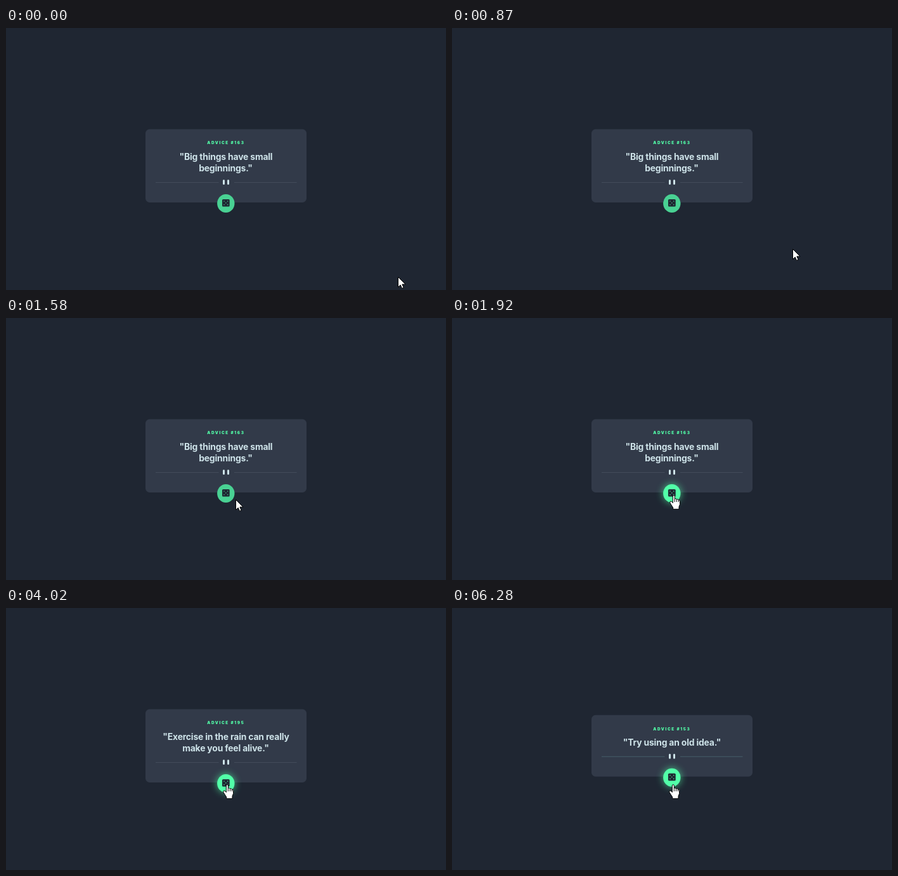
An HTML page for the animation above (8 s loop, 694 by 413 pixels).

```html
<!DOCTYPE html>
<html lang="en">
<head>
<meta charset="utf-8">
<title>Advice card</title>
<style>
html, body { margin: 0; width: 100%; height: 100%; overflow: hidden; background: #1f2632; }
svg { display: block; }
text { font-family: Inter, "Open Sans", sans-serif; }
#label { font-size: 6.3px; font-weight: 900; letter-spacing: 1.62px; fill: #52ffa8; }
.quote { font-size: 13.9px; font-weight: 700; letter-spacing: -.18px; fill: #cee3e9; text-anchor: middle; }
</style>
</head>
<body>
<svg width="694" height="413" viewBox="0 0 694 413">
  <defs>
    <filter id="blur" x="-100%" y="-100%" width="300%" height="300%"><feGaussianBlur stdDeviation="6"/></filter>
  </defs>
  <rect id="card" x="220" width="254" rx="6.5" fill="#323a49"/>
  <text id="label" x="317.3"></text>
  <text id="line1" class="quote" x="347"></text>
  <text id="line2" class="quote" x="346.5" y="226"></text>
  <g id="divider">
    <path id="rule" d="M236 .5H335.5M360 .5H458.5"/>
    <path d="M343.5 -2.5v5M350.5 -2.5v5" stroke="#cee3e9" stroke-width="3" stroke-linecap="round"/>
  </g>
  <g id="button">
    <ellipse id="glow" rx="14.5" ry="15" fill="#52ffa8" opacity=".6" filter="url(#blur)"/>
    <ellipse id="disc" rx="13.7" ry="14.5"/>
    <rect x="-5.8" y="-6.6" width="11.7" height="11.7" rx="1.6" fill="#1f2632"/>
    <path id="pips" d="M-2.8 -3.6h0M2.8 -3.6h0M0 -.8h0M-2.8 2h0M2.8 2h0" stroke-width="1.5" stroke-linecap="round"/>
  </g>
  <circle id="click" r="12" fill="#ff0" opacity=".5"/>
  <g id="cursor" fill="#fff" stroke="#000" stroke-linejoin="round">
    <path id="arrow" d="M.5 .5V16.5L4.2 13.1 6.6 18.4 9.2 17.3 6.9 12H12Z"/>
    <path id="hand" d="M-.7 12.5V2Q-.7 .5 .8 .5T2.3 2V6Q3.9 5 5.4 6.8Q7 6 8.4 7.8Q10.6 7.6 10.6 9.6V14.5L9 18.5V22.3H-.3V20L-3.2 15.5 -5.3 12Q-5.6 10 -3.8 10T-.7 12.5ZM2.3 6V11M5.4 6.8V11M8.4 7.8V11"/>
  </g>
</svg>
<script>
const LOOP = 8000;
const $ = id => document.getElementById(id);
const set = (id, attrs) => {
  for (const k in attrs) $(id).setAttribute(k, attrs[k]);
};
const show = (id, on) => set(id, { visibility: on ? "visible" : "hidden" });
const lastBefore = (list, t) => list.filter(s => s[0] <= t).pop();

const advice = [
  [0, 163, '"Big things have small', 'beginnings."'],
  [4020, 195, '"Exercise in the rain can really', 'make you feel alive."'],
  [6280, 153, '"Try using an old idea."', '']
];
const stops = [
  [0, 618, 392], [70, 588, 365], [210, 575, 357], [275, 565, 353], [340, 558, 351],
  [1650, 354, 283], [1810, 352, 281], [1865, 350, 280], [1920, 349, 279], [2580, 348, 278]
];

// The long sweep toward the button moves in 71 ms steps and slows down.
function pointer(t) {
  if (t >= 870 && t < 1650) {
    const left = (1 - Math.floor((t - 870) / 71) * 71 / 781) ** 1.3;
    return [Math.round(354 + 183 * left), Math.round(283 + 65 * left)];
  }
  return lastBefore(stops, t).slice(1);
}

function draw(t) {
  const [, number, first, second] = lastBefore(advice, t);
  const inset = second ? 0 : 9.25; // a one-line card is shorter by half a line at each end
  const hover = t >= 1750;
  const green = hover ? "#52ffa8" : "#49d193";
  const [x, y] = pointer(t);

  set("card", { y: 159.5 + inset, height: 115.5 - 2 * inset });
  set("label", { y: 183.3 + inset });
  set("line1", { y: 208 + inset });
  $("label").textContent = "ADVICE #" + number;
  $("line1").textContent = first;
  $("line2").textContent = second;
  set("divider", { transform: `translate(0 ${243 - inset})` });
  set("rule", { stroke: second ? "#434c5b" : "#465e69" });
  set("button", { transform: `translate(346.8 ${276.5 - inset})` });
  set("disc", { fill: green });
  set("pips", { stroke: green });
  show("glow", hover);

  show("click", (t >= 2710 && t < 3310) || (t >= 5890 && t < 5950));
  set("click", { cx: x, cy: y });
  set("cursor", { transform: `translate(${x} ${y})` });
  show("arrow", !hover);
  show("hand", hover);
}

const start = performance.now();
function tick() {
  draw((performance.now() - start) % LOOP);
  requestAnimationFrame(tick);
}
tick();
</script>
</body>
</html>
```
